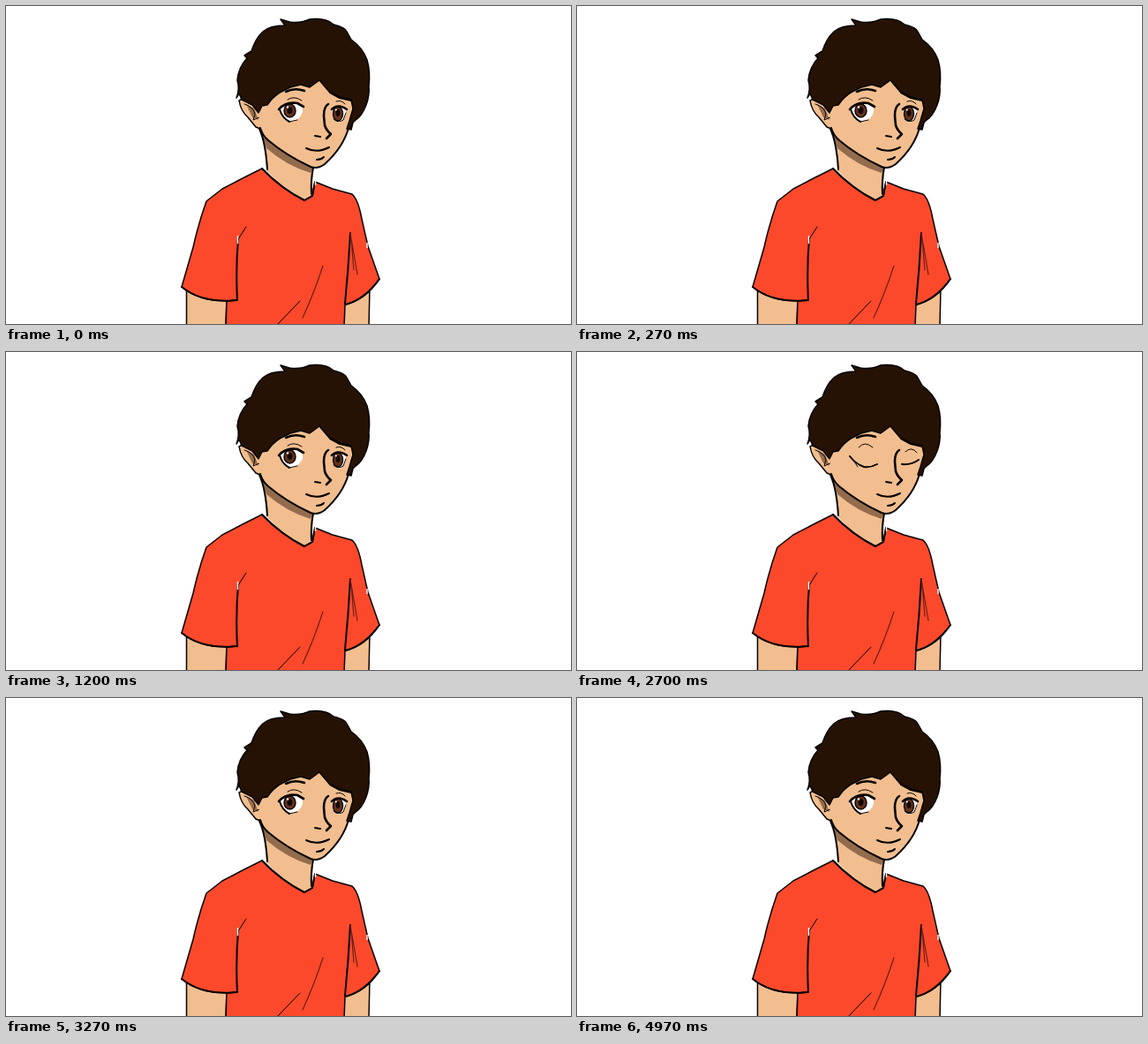
An HTML page that plays this animation: 640x360 px, repeating every 5210 ms.

```html
<!DOCTYPE html>
<html lang="en">
<head>
<meta charset="utf-8">
<title>Blinking boy</title>
<style>
  html, body { margin: 0; width: 100%; height: 100%; overflow: hidden; background: #fff; }
  svg { display: block; width: 100vw; height: 100vh; }
  .ink { fill: none; stroke: #050202; stroke-width: 2; stroke-linecap: round; stroke-linejoin: round; }
  .edge { stroke: #050202; stroke-width: 1.5; stroke-linejoin: round; }
  .thin { stroke-width: 1; }
  .bold { stroke-width: 2.6; }
  .fold { stroke: #6b2016; stroke-width: 1.2; }
  .skin { fill: #f2be8f; }
  .shirt { fill: #fd492b; }
  .hair { fill: #261204; }
  .shade { fill: #936c4d; }
  .open { animation: open 5210ms step-end infinite; }
  .shut { animation: shut 5210ms step-end infinite; }
  /* Lids drop for 170 ms at 100, 1030, 2700, 3100 and 4800 ms. */
  @keyframes open {
    0%, 5.1823%, 23.0326%, 55.0864%, 62.7639%, 95.3935%, 100% { opacity: 1; }
    1.9194%, 19.7697%, 51.8234%, 59.501%, 92.1305% { opacity: 0; }
  }
  @keyframes shut {
    0%, 5.1823%, 23.0326%, 55.0864%, 62.7639%, 95.3935%, 100% { opacity: 0; }
    1.9194%, 19.7697%, 51.8234%, 59.501%, 92.1305% { opacity: 1; }
  }
</style>
</head>
<body>
<svg viewBox="0 0 640 360">
  <g id="arms">
    <path class="skin edge" d="M204.500 318V364H249L250 328Z"/>
    <path class="skin edge" d="M383 332L382 364H411L412 318Z"/>
  </g>

  <g id="neck">
    <path class="skin" d="M287 136Q294 153 295 186L318 210L338 220L347 214L348 178L320 150Z"/>
    <path class="shade" d="M289 142L315 164L348 182L345 189Q318 181 295 161Z"/>
    <path class="ink" d="M287 139Q294 154 296 185M348 183Q345 197 346 213"/>
  </g>

  <g id="shirt">
    <path class="shirt edge" d="M290 184L268 195L245 207L227 221Q218 246 212 273L199 318Q222 337 262 333L250 334L249 364H383L384 338Q407 333 423 309L410 272L403 241Q399 219 392 213L370 207L350 199L347 215L338 220Q312 207 290 184Z"/>
    <path class="ink" d="M290 184Q312 207 338 220L347 215L350 199M199 318Q222 337 262 333Q260 300 263 263M385 338Q406 332 423 309M384 337Q388 296 390 257"/>
    <path class="ink thin" d="M263 264L272 250M333 334L307 361"/>
    <path class="ink fold" d="M359 294Q349 325 336 353M390 257L398 304M391 264L394 299"/>
    <path d="M262.500 260v9M350.500 197v6M409 268v6" stroke="#fff" stroke-width="1.400"/>
  </g>

  <g id="head">
    <path class="skin edge" d="M264 107Q266 119 274 126L283 137L288 139L296 112L278 100Z"/>
    <path class="shade" d="M272 111L281 116L286 129L279 126Z"/>
    <path class="ink thin" d="M270 111Q280 114 282 122L280 129L287 126"/>
    <path class="skin" d="M288 138Q290 146 297 152Q317 169 345 182Q353 185 361 179Q382 160 388 138L394 104L355 76L300 88L286 118Z"/>
    <path class="ink" d="M288 138Q290 146 297 152Q317 169 345 182Q353 185 361 179Q382 160 388 138"/>
    <path class="hair edge" d="M311 15L321 18Q333 20 344 15Q363 13 371 21Q384 24 386 29L391 38Q404 47 409 61Q413 75 411 91Q412 101 408 112Q403 125 396 129L393 132L391 140L386 139L389 130L393 116L391 106L378 103L366 97L355 84L344 92L334 89L322 92L310 98Q302 103 296 112L290 113L286 121L279 112L267 106L264 99L261 104Q265 94 262 84Q263 70 273 59L270 56L278 51Q283 36 291 29Q299 22 316 22Z"/>
    <path class="ink" stroke-linecap="round" d="M367 98L378 104L391 107"/>
    <path class="ink bold" d="M317 97Q327 92 338 96M365 111Q360 114 360 124L361 135Q363 141 368 145L363 150"/>
    <path class="ink" d="M350 147L356 148M340 161Q352 167 366 160M352 174Q357 174 360 171"/>
  </g>

  <g class="open">
    <path fill="#fff" d="M310 117Q318 108 330 110Q337 113 336 120Q333 130 322 131Q314 128 310 117ZM369 117Q376 110 385 117Q386 127 378 132Q370 131 369 117Z"/>
    <g fill="#63321d" stroke="#140804" stroke-width="1.500">
      <ellipse cx="321.500" cy="118.500" rx="6.500" ry="7.500"/>
      <ellipse cx="376" cy="122" rx="5.500" ry="8"/>
    </g>
    <g fill="#130805">
      <ellipse cx="321.500" cy="118" rx="3" ry="4"/>
      <ellipse cx="376" cy="121" rx="2.500" ry="4"/>
    </g>
    <path d="M318 114l2 1M373 117l1.500 1" stroke="#fff" stroke-width="2"/>
    <path class="ink bold" d="M309 117Q317 108 330 110L337 114M369 117Q376 110 386 117"/>
    <path class="ink" d="M310 117Q313 127 321 131"/>
    <path class="ink thin" d="M321 131L330 129M371 128Q376 133 382 129L385 121M319 106Q326 101 335 107M374 108Q380 106 384 111"/>
  </g>

  <g class="shut">
    <path class="ink" d="M309 118Q316 127 325 130Q333 131 340 127M368 127Q379 128 387 122"/>
    <path class="ink thin" d="M314 124L318 130M319 108Q326 100 335 108M372 113Q379 106 385 114"/>
  </g>
</svg>
</body>
</html>
```
